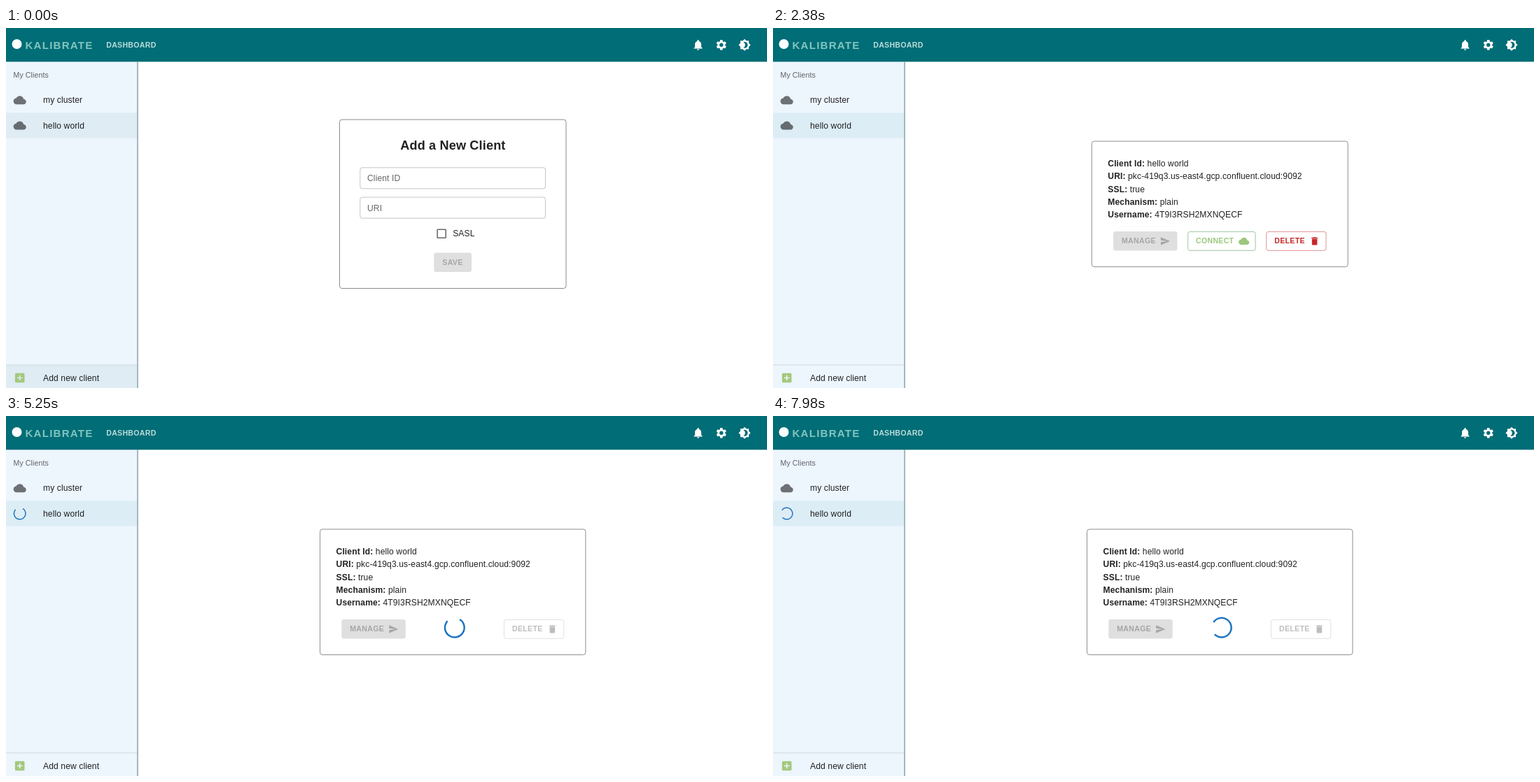
An HTML page with a canvas for the animation above (8 s loop, 1087 px wide and 515 px high).

```html
<!DOCTYPE html>
<html lang="en">
<head>
<meta charset="utf-8">
<title>Client dashboard</title>
<style>
  html, body { margin: 0; width: 100%; height: 100%; overflow: hidden; background: #fff; }
  canvas { display: block; width: 1087px; height: 515px; }
</style>
</head>
<body>
<canvas id="stage"></canvas>
<script>
const W = 1087, H = 515, LOOP = 8000, STEP = 70;
const OPEN = 1050, HOVER = 3450, PRESS = 4240, CONNECT = 4340;
const SLOW = 1.05;
const FONT = '"Liberation Sans", Arial, sans-serif';
const INK = 'rgba(0,0,0,0.87)', MUTED = 'rgba(0,0,0,0.6)', OFF = 'rgba(0,0,0,0.26)';
const GREEN = [156, 199, 125], RED = [198, 40, 40], SIDE = [237, 245, 253];
const BODY = 12.08, SMALL = 10.57;

const ICONS = {
  cloud: 'M19.35 10.04C18.67 6.59 15.64 4 12 4 9.11 4 6.6 5.64 5.35 8.04 2.34 8.36 0 10.91 0 14c0 3.31 2.69 6 6 6h13c2.76 0 5-2.24 5-5 0-2.64-2.05-4.78-4.65-4.96z',
  add: 'M19 3H5c-1.11 0-2 .9-2 2v14c0 1.1.89 2 2 2h14c1.1 0 2-.9 2-2V5c0-1.1-.9-2-2-2zm-2 10h-4v4h-2v-4H7v-2h4V7h2v4h4v2z',
  trash: 'M6 19c0 1.1.9 2 2 2h8c1.1 0 2-.9 2-2V7H6v12zM19 4h-3.5l-1-1h-5l-1 1H5v2h14V4z',
  send: 'M2.01 21 23 12 2.01 3 2 10l15 2-15 2z',
  bell: 'M12 22c1.1 0 2-.9 2-2h-4c0 1.1.89 2 2 2zm6-6v-5c0-3.07-1.64-5.64-4.5-6.32V4c0-.83-.67-1.5-1.5-1.5s-1.5.67-1.5 1.5v.68C7.63 5.36 6 7.92 6 11v5l-2 2v1h16v-1l-2-2z',
  theme: 'M20 8.69V4h-4.69L12 .69 8.69 4H4v4.69L.69 12 4 15.31V20h4.69L12 23.31 15.31 20H20v-4.69L23.31 12 20 8.69zM12 18c-.89 0-1.74-.2-2.5-.55C11.56 16.5 13 14.42 13 12s-1.44-4.5-3.5-5.45C10.26 6.2 11.11 6 12 6c3.31 0 6 2.69 6 6s-2.69 6-6 6z',
  box: 'M19 5v14H5V5h14m0-2H5c-1.1 0-2 .9-2 2v14c0 1.1.9 2 2 2h14c1.1 0 2-.9 2-2V5c0-1.1-.9-2-2-2z'
};
const icons = {};
for (const name in ICONS) icons[name] = new Path2D(ICONS[name]);
icons.gear = gearPath();

const canvas = document.getElementById('stage');
const ctx = canvas.getContext('2d');
const dpr = window.devicePixelRatio || 1;
canvas.width = W * dpr;
canvas.height = H * dpr;

const clamp = v => Math.min(1, Math.max(0, v));
const mix = (a, b, k) => a.map((v, i) => v + (b[i] - v) * k);
const rgb = (c, a = 1) => `rgba(${c.slice(0, 3).join(',')},${a})`;
const rgba = c => `rgba(${c.join(',')})`;

function bezier(x1, y1, x2, y2) {
  const at = (s, a, b) => 3 * s * (1 - s) ** 2 * a + 3 * s * s * (1 - s) * b + s ** 3;
  return x => {
    if (x <= 0 || x >= 1) return clamp(x);
    let lo = 0, hi = 1;
    for (let i = 0; i < 24; i++) {
      const mid = (lo + hi) / 2;
      if (at(mid, x1, x2) < x) lo = mid; else hi = mid;
    }
    return at(lo, y1, y2);
  };
}
const standard = bezier(0.4, 0, 0.2, 1);
const easeInOut = bezier(0.42, 0, 0.58, 1);
const fade = (t, start, ms) => standard(clamp((t - start) / (ms * SLOW)));

function gearPath() {
  const p = new Path2D();
  for (let i = 0; i < 6; i++) {
    for (const [r, off] of [[7.2, -22], [9.8, -13], [9.8, 13], [7.2, 22]]) {
      const a = (i * 60 - 90 + off) * Math.PI / 180;
      p.lineTo(12 + r * Math.cos(a), 12 + r * Math.sin(a));
    }
  }
  p.closePath();
  p.moveTo(15.6, 12);
  p.arc(12, 12, 3.6, 0, Math.PI * 2);
  return p;
}

function icon(name, cx, cy, size, color) {
  ctx.save();
  ctx.translate(cx - size / 2, cy - size / 2);
  ctx.scale(size / 24, size / 24);
  ctx.fillStyle = color;
  ctx.fill(icons[name], 'evenodd');
  ctx.restore();
}

// Draws text and returns the x where it ends.
function text(str, x, y, size, color, { bold = false, gap = 0.113, align = 'left' } = {}) {
  ctx.font = `${bold ? 'bold ' : ''}${size}px ${FONT}`;
  ctx.letterSpacing = gap + 'px';
  ctx.textAlign = align;
  ctx.fillStyle = color;
  ctx.fillText(str, x, y);
  return x + ctx.measureText(str).width;
}

function rect(x, y, w, h, color) {
  ctx.fillStyle = color;
  ctx.fillRect(x, y, w, h);
}

function rounded(x, y, w, h, r, fill, stroke) {
  ctx.beginPath();
  ctx.roundRect(x, y, w, h, r);
  if (fill) { ctx.fillStyle = fill; ctx.fill(); }
  if (stroke) { ctx.strokeStyle = stroke; ctx.lineWidth = 1; ctx.stroke(); }
}

function ripple(cx, cy, radius, alpha, box) {
  ctx.save();
  ctx.beginPath();
  ctx.rect(...box);
  ctx.clip();
  ctx.beginPath();
  ctx.arc(cx, cy, radius, 0, Math.PI * 2);
  ctx.fillStyle = alpha;
  ctx.fill();
  ctx.restore();
}

function spinner(cx, cy, size, t) {
  const k = size / 44, r = 20.2, p = ((t - CONNECT) / (1400 * SLOW)) % 1;
  const grow = easeInOut(clamp(p * 2)), slide = easeInOut(clamp(p * 2 - 1));
  const from = 15 * grow + 110 * slide;
  const to = Math.min(from + 1 + 99 * grow, Math.PI * 2 * r);
  const turn = p * Math.PI * 2;
  ctx.beginPath();
  ctx.arc(cx, cy, r * k, turn + from / r, turn + to / r);
  ctx.lineWidth = 3.6 * k;
  ctx.strokeStyle = '#1d74c2';
  ctx.stroke();
}

function header() {
  rect(0, 0, W, 48.3, '#006d77');
  ctx.beginPath();
  ctx.arc(15.5, 23, 7, 0, Math.PI * 2);
  ctx.fillStyle = '#fff';
  ctx.fill();
  text('KALIBRATE', 27.5, 29.6, 15.1, '#83c5be', { bold: true, gap: 1.21 });
  text('DASHBOARD', 143.2, 28.1, SMALL, '#b9dcda', { bold: true, gap: 0.302 });
  icon('bell', 988.6, 24.2, 18.12, '#fff');
  icon('gear', 1021.8, 24.2, 18.12, '#fff');
  icon('theme', 1055, 24.2, 18.12, '#fff');
}

function sidebar(t) {
  const hover = [223, 236, 244];
  const opened = fade(t, OPEN, 150);
  rect(0, 48.3, 187.5, H, rgb(SIDE));

  let row = mix(hover, [213, 230, 244], opened);
  row = mix(row, [221, 237, 245], fade(t, 1330, 150));
  rect(0, 121.3, 187.5, 36.2, rgb(row));
  rect(0, 482, 187.5, 33, rgb(mix(hover, SIDE, opened)));
  rect(0, 481.5, 187.5, 1, '#d0d9df');
  rect(187.4, 48.3, 1.2, H, '#6b8f95');

  text('My Clients', 10.5, 70.6, SMALL, MUTED);
  icon('cloud', 19.7, 103.2, 18.12, 'rgba(0,0,0,0.54)');
  text('my cluster', 53, 107.4, BODY, INK);
  if (t < CONNECT) icon('cloud', 19.7, 139.5, 18.12, 'rgba(0,0,0,0.54)');
  else spinner(19.7, 139.5, 18.12, t);

  const start = 955;
  if (t >= 980 && t < 1610) {
    const grown = fade(t, start, 550);
    const alpha = 0.26 * (1 - fade(t, 1030, 550));
    ripple(97, 135, 99 * grown, `rgba(0,0,0,${alpha})`, [0, 121.3, 187.5, 36.2]);
  }
  text('hello world', 53, 143.6, BODY, INK);
  icon('add', 19.7, 500.5, 18.12, '#a3c97c');
  text('Add new client', 53, 504.8, BODY, INK);
}

function newClient() {
  rounded(476.5, 131, 323.5, 241.5, 3.5, '#fff', '#8c8c8c');
  text('Add a New Client', 638.4, 174, 18.12, INK, { bold: true, gap: 0.15, align: 'center' });
  rounded(505.8, 199.8, 264.7, 30, 3, null, 'rgba(0,0,0,0.23)');
  rounded(505.8, 242.1, 264.7, 30, 3, null, 'rgba(0,0,0,0.23)');
  text('Client ID', 516, 219.4, BODY, MUTED);
  text('URI', 516, 261.7, BODY, MUTED);
  icon('box', 622.2, 294.2, 18.12, MUTED);
  text('SASL', 638.2, 297.6, BODY, INK);
  rounded(611.3, 321.4, 53.7, 27.6, 3, '#dfdfdf');
  text('SAVE', 623.3, 339, SMALL, OFF, { bold: true, gap: 0.302 });
}

function label(str, x, color) {
  text(str, x, 308.3, SMALL, color, { bold: true, gap: 0.302 });
}

function connectButton(t) {
  const k = fade(t, HOVER, 250);
  rounded(592.7, 291.4, 96.4, 26.9, 3, rgb(GREEN, 0.04 * k), rgba(mix([159, 196, 160, 1], [...GREEN, 1], k)));
  if (t >= PRESS) {
    ripple(641, 305, 60 * fade(t, PRESS, 550), rgb(GREEN, 0.25), [592.7, 291.4, 96.4, 26.9]);
  }
  label('CONNECT', 604, rgb(GREEN));
  icon('cloud', 672.7, 304.9, 15.1, rgb(GREEN));
}

function details(t) {
  const busy = t >= CONNECT;
  const dx = busy ? 6.75 : 0;
  const k = fade(t, CONNECT, 250);
  rounded(455.3 - dx, 162, 365.9 + 2 * dx, 179.6, 3.5, '#fff', '#8c8f8f');

  const rows = [
    ['Client Id:', 'hello world'],
    ['URI:', 'pkc-419q3.us-east4.gcp.confluent.cloud:9092'],
    ['SSL:', 'true'],
    ['Mechanism:', 'plain'],
    ['Username:', '4T9I3RSH2MXNQECF']
  ];
  rows.forEach(([name, value], i) => {
    const y = 198.3 + i * 18.12;
    const x = text(name, 478.3 - dx, y, BODY, INK, { bold: true });
    text(' ' + value, x, y, BODY, INK);
  });

  const fill = busy ? mix([209, 217, 222], [223, 223, 223], k) : [223, 223, 223];
  rounded(486.1 - dx, 291, 91.4, 27.6, 3, rgb(fill));
  label('MANAGE', 498 - dx, OFF);
  icon('send', 560.2 - dx, 304.9, 15.1, OFF);

  if (busy) spinner(640.8, 302.7, 30.2, t);
  else connectButton(t);

  const color = rgba(mix([...RED, 1], [0, 0, 0, 0.26], k));
  const edge = rgba(mix([...RED, 0.5], [0, 0, 0, 0.12], k));
  rounded(704.7 + dx, 291.4, 85.3, 26.9, 3, null, edge);
  label('DELETE', 716.3 + dx, color);
  icon('trash', 773.6 + dx, 304.9, 15.1, color);
}

function draw(now) {
  const t = Math.floor((now % LOOP) / STEP) * STEP;
  ctx.setTransform(dpr, 0, 0, dpr, 0, 0);
  rect(0, 0, W, H, '#fff');
  sidebar(t);
  header();
  if (t < OPEN) newClient();
  else details(t);
}

let begin = null;
function tick(now) {
  if (begin === null) begin = now;
  draw(now - begin);
  requestAnimationFrame(tick);
}
draw(0);
requestAnimationFrame(tick);
</script>
</body>
</html>
```
